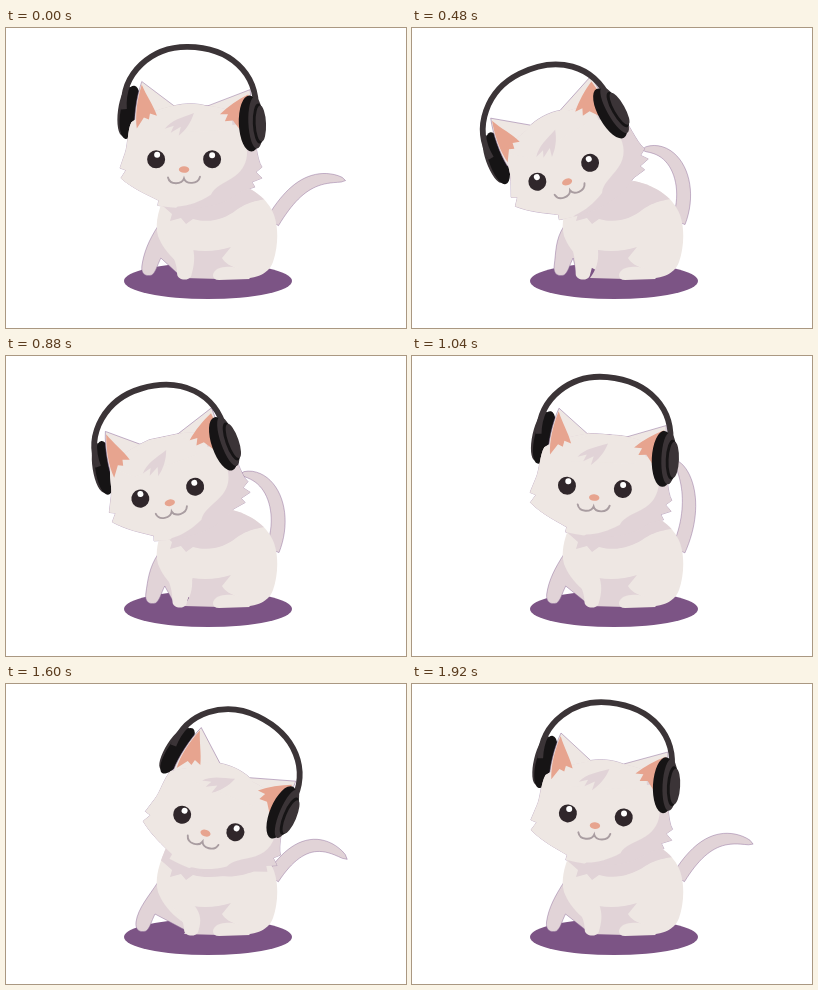
These frames come from a looping animation (400x300 px, 1960 ms). An HTML page:

```html
<!DOCTYPE html>
<html lang="en">
<head>
<meta charset="utf-8">
<title>Cat with headphones</title>
<style>
  html, body { margin: 0; width: 100%; height: 100%; overflow: hidden; background: #fff; }
  svg { display: block; width: 100vw; height: 100vh; }
  .light { fill: #eee7e3; }
  .shade { fill: #e1d3d7; }
  .pink { fill: #e7a48f; }
  .pad { fill: #161415; }
  .shell { fill: #3b3437; }
  .eye { fill: #30272b; }
  .rim { stroke: #8d6c9a; stroke-opacity: .6; stroke-width: .8; }
</style>
</head>
<body>
<svg viewBox="0 0 400 300">
  <defs>
    <path id="faceShape" d="M125 95 C121 103 122 118 119 126 L114 141 L120 143 L115 151 C128 162 141 167 153 173
      L152 178 C170 181 190 182 206 178 C220 175 228 169 236 163 L249 159 L246 154 L256 150 L250 144 L256 139
      C250 131 250 108 243 95 C232 83 215 79 200 78 L168 78 C150 82 134 88 125 95Z"/>
    <path id="torsoShape" d="M160 164 C154 178 148 194 152 208 C158 224 176 246 212 250 C234 252 260 253 267 234
      C273 216 272 198 268 187 C262 171 246 158 222 153Z"/>
    <clipPath id="faceClip"><use href="#faceShape"/></clipPath>
    <clipPath id="torsoClip"><use href="#torsoShape"/></clipPath>
  </defs>

  <ellipse cx="202" cy="253" rx="84" ry="18" fill="#7c5485"/>
  <path id="tail" class="shade rim"/>
  <g id="faceRim"><use href="#faceShape" class="shade rim"/></g>
  <path id="farLeg" class="shade rim"/>
  <use href="#torsoShape" class="light"/>
  <path class="shade" d="M186 222 C200 224 212 223 225 219 L216 230 C219 236 226 238 231 241 L214 251 L178 250 C184 242 187 234 186 222Z"/>
  <g clip-path="url(#torsoClip)"><path id="neck" class="shade"/></g>
  <path class="light" d="M207 247 C208 239 220 237 232 240 L244 251 L213 252 Q207 252 207 247Z"/>
  <path id="nearLeg" class="light"/>

  <g id="farCup">
    <ellipse class="shell" cx="119" cy="84" rx="8" ry="25" transform="rotate(7 119 84)"/>
    <ellipse class="pad" cx="123" cy="85" rx="9.5" ry="27" transform="rotate(9 123 85)"/>
  </g>
  <g id="ears">
    <path class="light rim" d="M128 104 C127 90 129 70 134.5 54 L167 78 C178 75 190 75 200 78 L243 61 L246 104 C230 130 145 130 128 104Z"/>
  </g>
  <g id="face">
    <use href="#faceShape" class="shade"/>
    <g clip-path="url(#faceClip)">
      <path id="faceLight" class="light" d="M70 60 L217 60 L222 97 L230 96 L229 104 C241 118 239 138 225 148 C214 156 205 158 201 167 C190 174 180 178 168 179 L140 200 L60 200Z"/>
    </g>
  </g>
  <g id="innerEars">
    <path class="light" d="M132 92 L167 78 C178 75 190 75 200 78 L213 85 L216 102 L150 106Z"/>
    <path class="pink" d="M134.5 57 C139 68 146 77 150 88 L143 86 L142 92 L137 90 L130 101 C128 88 130 72 134.5 57Z"/>
    <path class="pink" d="M241 66 C231 71 221 78 213 86 L221 86 L218 93 L226 92 L233 101 L246 97Z"/>
  </g>
  <g id="tuft">
    <path class="shade" d="M158 101 C165 92 175 90 187 85 C184 95 179 102 172 108 L174 99 L164 105 L167 98Z"/>
  </g>
  <g id="features">
    <g class="eye"><circle cx="150" cy="132" r="9"/><circle cx="206" cy="131.5" r="9"/></g>
    <g fill="#fff"><circle cx="151" cy="127.5" r="3"/><circle cx="206" cy="127.5" r="3"/></g>
    <ellipse class="pink" cx="178" cy="142" rx="5.2" ry="3.3"/>
    <path d="M162 150 C164 158 176 157 178 151 C180 157 192 157 194 149" fill="none" stroke="#a99da1" stroke-width="1.9" stroke-linecap="round"/>
  </g>
  <g id="headset">
    <path d="M117 82 C114 46 144 19 180 19 C222 19 250 44 249 82" fill="none" stroke="#3b3437" stroke-width="5.8"/>
    <ellipse class="pad" cx="243.5" cy="95" rx="11.5" ry="28" transform="rotate(-3 243.5 95)"/>
    <ellipse class="shell" cx="249" cy="94" rx="7.5" ry="26" transform="rotate(-3 249 94)"/>
    <ellipse class="pad" cx="252" cy="95" rx="6" ry="20" transform="rotate(-3 252 95)"/>
    <ellipse class="shell" cx="254" cy="95" rx="5.2" ry="18" transform="rotate(-3 254 95)"/>
  </g>
</svg>
<script>
const LOOP = 1960, STEP = 40;
const el = id => document.getElementById(id);
const mix = (a, b, k) => a + (b - a) * k;
const ease = p => p < .5 ? 4 * p ** 3 : 1 - 4 * (1 - p) ** 3;

// Eased swing: 1 at time `high`, 0 from time `low` for `hold` ms, and back
function swing(t, high, low, hold = 0) {
  const since = (t - high + LOOP) % LOOP;
  const fall = (low - high + LOOP) % LOOP;
  if (since < fall) return 1 - ease(since / fall);
  return ease(Math.max(0, since - fall - hold) / (LOOP - fall - hold));
}

function place(ids, x, y, angle, px, py) {
  for (const id of ids)
    el(id).setAttribute('transform', `translate(${x} ${y}) rotate(${angle}) translate(${-px} ${-py})`);
}

function tailPath(curl) {
  const base = [266.5, 194];
  const polar = (deg, r) => [base[0] + r * Math.cos(deg * Math.PI / 180), base[1] - r * Math.sin(deg * Math.PI / 180)];
  const p = [base, polar(57 + 12 * curl, 40), polar(43 + 50 * curl, 64 + 16 * curl ** 2),
    polar(14 + 105 * curl, 77 + 55 * curl - 52 * curl ** 2)];
  const left = [], right = [], count = 24;
  for (let i = 0; i <= count; i++) {
    const s = i / count, q = 1 - s;
    const at = k => q ** 3 * p[0][k] + 3 * q * q * s * p[1][k] + 3 * q * s * s * p[2][k] + s ** 3 * p[3][k];
    const slope = k => q * q * (p[1][k] - p[0][k]) + 2 * q * s * (p[2][k] - p[1][k]) + s * s * (p[3][k] - p[2][k]);
    const x = at(0), y = at(1), dx = slope(0), dy = slope(1);
    const w = 7 * Math.sqrt(1 - s ** 3) / Math.hypot(dx, dy);
    left.push(`${x - dy * w} ${y + dx * w}`);
    right.unshift(`${x + dy * w} ${y - dx * w}`);
  }
  return `M${left.concat(right).join('L')}Z`;
}

function draw(t) {
  const tilt = mix(-20, 18.3, swing(t, 1468, 500, 42));
  const turn = tilt + .8;
  // Extra parallax of the ears and cheeks when leaning left
  const lift = turn * (1 - turn / 17) / 34;

  const noseX = 178.5 + 1.17 * tilt, noseY = 141.5 + .0276 * tilt ** 2 - .07 * tilt;
  place(['features'], noseX, noseY, turn, 178, 142);
  place(['face', 'faceRim'], noseX - 4 * lift, noseY + 4 * lift, turn, 178, 142);
  el('faceLight').setAttribute('transform', `translate(${4 + .2 * turn} 0)`);

  const bob = 1.3 * Math.cos(2 * Math.PI * t / LOOP);
  const crownX = 183.5 + 2.15 * turn, crownY = 91.3 - bob + .0323 * turn ** 2 - .238 * turn;
  place(['farCup', 'tuft', 'headset'], crownX, crownY, 1.38 * turn, 183.5, 90);
  place(['ears', 'innerEars'], crownX + 3 * lift, crownY + 6 * lift, 1.38 * turn, 183.5, 90);

  const far = 142 - .32 * turn, near = 179 + .38 * turn;
  el('farLeg').setAttribute('d', `M152 198 C143 212 ${far - 4} 224 ${far - 6} 238
    C${far - 7} 246 ${far - 2} 249 ${far + 4} 247 C${far + 8} 244 ${far + 9} 238 ${far + 13} 230
    L${near - 7} 246 L182 215Z`);
  el('nearLeg').setAttribute('d', `M157 206 C160 222 ${near - 8} 228 ${near - 8} 246
    C${near - 8} 252 ${near + 3} 254 ${near + 6} 248 C${near + 9} 238 ${near + 10} 230 187 220 L190 206Z`);

  const drop = Math.max(turn, 0) * .5;
  el('neck').setAttribute('d', `M150 172 L166 186 L164 193 L175 190 L180 196 L187 191
    C205 196 220 190 230 ${182 + drop} C240 ${175 + drop} 250 ${171 + drop} 272 ${170 + drop} L240 140 L150 150Z`);

  el('tail').setAttribute('d', tailPath(swing(t, 1640, 640) < 0 ? 0 : swing(t, 640, 1640)));
}

const start = performance.now();
function tick() {
  const t = (performance.now() - start) % LOOP;
  draw(Math.floor(t / STEP) * STEP);
  requestAnimationFrame(tick);
}
tick();
</script>
</body>
</html>
```
